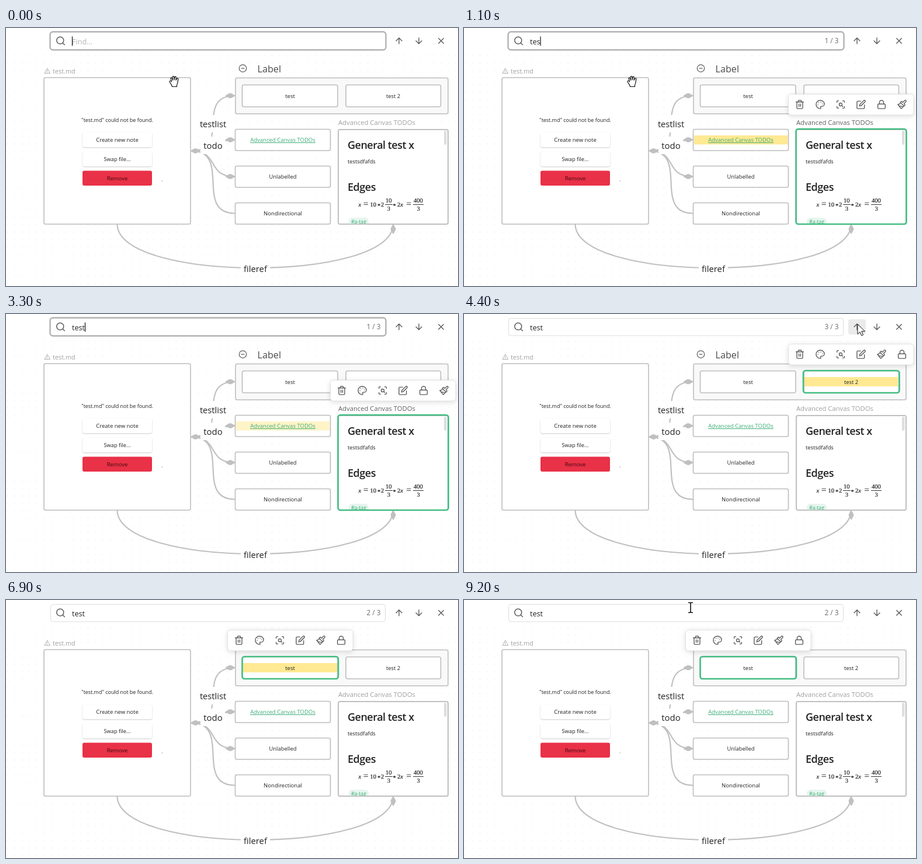
An HTML page for the animation above (9300 ms loop, 774x442 px).

```html
<!DOCTYPE html>
<html lang="en">
<head>
<meta charset="utf-8">
<title>Canvas search</title>
<style>
html, body { margin: 0; width: 100%; height: 100%; overflow: hidden; background: #fff; }
svg { display: block; width: 774px; height: 442px; font-family: "Open Sans", "Noto Sans", sans-serif; }
text { fill: #222; white-space: pre; }
.mid { text-anchor: middle; }
.end { text-anchor: end; }
.head { font-weight: 600; letter-spacing: -.5px; }
.math { font-family: "Liberation Serif", serif; stroke: #222; stroke-width: .2px; }
.node { fill: #fff; stroke: #bdbdbd; stroke-width: 1.6; }
.picked { fill: none; stroke: #43bd82; stroke-width: 2.6; }
.flash { fill: #ffe993; opacity: 0; }
.edge { fill: none; stroke: #c0c0c0; stroke-width: 2.2; }
.tip { fill: #c0c0c0; stroke: #c0c0c0; stroke-width: 2; stroke-linejoin: round; }
.icon { fill: none; stroke: #5c5c5c; stroke-width: 2; stroke-linecap: round; stroke-linejoin: round; }
.card { fill: #fff; filter: drop-shadow(0 1px 1px #0003); }
.bar { fill: #fff; stroke: #e2e2e2; filter: drop-shadow(0 2px 4px #0002); }
</style>
</head>
<body>
<svg id="stage" viewBox="0 0 774 442">
  <defs>
    <pattern id="dots" x="-4.3" y="3.1" width="12.6" height="12.6" patternUnits="userSpaceOnUse">
      <circle cx="6.3" cy="6.3" r=".7" fill="#e6e6e6"/>
    </pattern>
    <clipPath id="note"><rect x="569" y="174" width="188" height="162" rx="4"/></clipPath>
    <path id="search" d="M19 11a8 8 0 1 1-16 0a8 8 0 0 1 16 0M21 21l-4.3-4.3"/>
    <path id="up" d="M12 19V5M5 12l7-7 7 7"/>
    <path id="down" d="M12 5v14M5 12l7 7 7-7"/>
    <path id="close" d="M18 6L6 18M6 6l12 12"/>
    <path id="minus" d="M22 12a10 10 0 1 1-20 0a10 10 0 0 1 20 0M8 12h8"/>
    <path id="warn" d="M12 3L2 21h20zM12 10v4M12 17.5v.1"/>
    <path id="trash" d="M3 6h18M19 6v14a2 2 0 0 1-2 2H7a2 2 0 0 1-2-2V6M8 6V4a2 2 0 0 1 2-2h4a2 2 0 0 1 2 2v2M10 11v6M14 11v6"/>
    <path id="palette" d="M12 2a10 10 0 0 0 0 20c.9 0 1.6-.7 1.6-1.7 0-.4-.2-.8-.4-1.1-.3-.3-.4-.7-.4-1.1a1.6 1.6 0 0 1 1.6-1.7h2c3 0 5.6-2.5 5.6-5.5C22 6 17.500 2 12 2zM13.500 6.500v.1M17.500 10.500v.1M8.500 7.500v.1M6.500 12.500v.1"/>
    <path id="scan" d="M3 7V5a2 2 0 0 1 2-2h2M17 3h2a2 2 0 0 1 2 2v2M21 17v2a2 2 0 0 1-2 2h-2M7 21H5a2 2 0 0 1-2-2v-2M15.500 12a3.500 3.500 0 1 1-7 0a3.500 3.500 0 0 1 7 0M17 17l-2.500-2.500"/>
    <path id="pen" d="M11 4H4a2 2 0 0 0-2 2v14a2 2 0 0 0 2 2h14a2 2 0 0 0 2-2v-7M18.500 2.500a2.100 2.100 0 0 1 3 3L12 15l-4 1 1-4z"/>
    <path id="lock" d="M5 11h14a2 2 0 0 1 2 2v7a2 2 0 0 1-2 2H5a2 2 0 0 1-2-2v-7a2 2 0 0 1 2-2zM7 11V7a5 5 0 0 1 10 0v4"/>
    <path id="brush" d="M18.400 2.600L14 7l-1.600-1.600a2 2 0 0 0-2.800 0L8 7l9 9 1.600-1.600a2 2 0 0 0 0-2.800L17 10l4.400-4.400a2.100 2.100 0 0 0-3-3zM9 8c-2 3-4 3.500-7 4l8 10c2-1 6-5 6-7M14.500 17.500L4.500 15"/>
  </defs>
</svg>
<script>
const LOOP = 9300;
const FLASH = 2000, FADE = 250;
const FIRST = 600, BLUR = 4150, SECOND = 5200;
const stage = document.getElementById('stage');

const text = (x, y, size, str, cls = '', extra = '') =>
  `<text x="${x}" y="${y}" font-size="${size}" class="${cls}" ${extra}>${str}</text>`;
const rect = (x, y, x2, y2, rx, extra = 'class="node"') =>
  `<rect x="${x}" y="${y}" width="${x2 - x}" height="${y2 - y}" rx="${rx}" ${extra}/>`;
const icon = (id, x, y, size = 17, extra = '') =>
  `<use href="#${id}" class="icon" transform="translate(${x} ${y}) scale(${size / 24}) translate(-12 -12)" ${extra}/>`;
const during = (from, to, body) => `<g data-on="${from} ${to}">${body}</g>`;
const flash = (start, x, y, x2, y2) => rect(x, y, x2, y2, 0, `class="flash" data-flash="${start}"`);
const tip = (x, y, turn = 0) =>
  `<path class="tip" d="M-7 0L-1-3.300H1L7 0L1 3.300H-1z" transform="translate(${x} ${y}) rotate(${turn})"/>`;
const branch = (y, bend) =>
  `<path class="edge" d="M317 210.500C${317 + bend} 210.500 ${392 - bend} ${y} 392 ${y}"/>`;
const mask = (x, y, x2, y2) => rect(x, y, x2, y2, 0, 'fill="#fff"');
const toolbar = (x, y, names) =>
  rect(x, y, x + 214.5, y + 35.5, 5, 'class="bar"') +
  names.split(' ').map((n, i) => icon(n, x + 19.5 + 35 * i, y + 17.5)).join('');

const edges =
  branch(116, 70) + branch(191.5, 40) + branch(254.5, 50) + branch(317.5, 70) +
  '<path class="edge" d="M190.500 336C190.500 436 663 436 663 336"/>' +
  tip(324.5, 210.5) + [116, 191.5, 254.5].map(y => tip(384, y)).join('') + tip(663, 344.5, 90) +
  mask(329, 149, 380, 179) + mask(333, 186, 375, 216) + mask(402, 400, 452, 424) +
  text(354.5, 169.5, 14.7, 'testlist', 'mid') +
  text(354.5, 207, 14.9, 'todo', 'mid') +
  text(427, 417.5, 14.8, 'fileref', 'mid');

const missingFile =
  icon('warn', 70.5, 73.5, 11, 'style="stroke:#a5a5a5"') +
  text(80, 77.5, 10.9, 'test.md', '', 'style="fill:#a0a0a0"') +
  rect(65, 85, 316, 336, 3) +
  text(190.5, 161, 8.95, '"test.md" could not be found.', 'mid') +
  rect(131, 179, 250, 204, 3, 'class="card"') +
  rect(131, 212, 250, 237, 3, 'class="card"') +
  rect(131, 244.5, 250, 270, 3, 'fill="#e93147"') +
  text(190.5, 195, 9.5, 'Create new note', 'mid') +
  text(190.5, 228, 9.25, 'Swap file...', 'mid') +
  text(190.5, 261, 9.5, 'Remove', 'mid', 'style="fill:#40090f"') +
  rect(266.5, 261.5, 268.5, 262.5, 0, 'fill="#999"');

const group =
  icon('minus', 405.5, 69, 15) +
  text(430.5, 76, 16.2, 'Label', '', 'style="fill:#4a4a4a"') +
  rect(393, 85.5, 757, 147, 3, 'class="node" style="fill:#f9f9f9"') +
  rect(404.5, 97.5, 568, 135, 3) + rect(582, 97.5, 744.5, 135, 3) +
  flash(SECOND, 406, 108, 567, 124) + flash(BLUR, 583, 108, 743, 124) +
  text(486.5, 120, 9.6, 'test', 'mid') + text(663, 120, 9.4, 'test 2', 'mid');

const leaves =
  [173.5, 236.5, 299.5].map(y => rect(392.5, y, 555.5, y + 36.5, 3)).join('') +
  flash(FIRST, 394, 184, 554, 199.5) +
  text(474, 195, 9.54, 'Advanced Canvas TODOs', 'mid', 'style="fill:#3bac78" text-decoration="underline"') +
  text(474, 258, 9.4, 'Unlabelled', 'mid') +
  text(474, 321, 9.55, 'Nondirectional', 'mid');

const title = color => text(569, 165.5, 11.25, 'Advanced Canvas TODOs', '', `style="fill:${color}"`);
const maths = [
  [603.5, 306, '<tspan font-style="italic">x</tspan>'], [612, 306, '='], [623.5, 306, '10'],
  [636, 308, '*'], [642, 306, '2'], [650, 299, '10'], [652.7, 313, '3'],
  [662.5, 308, '*'], [670, 306, '2<tspan font-style="italic">x</tspan>'], [685.5, 306, '='],
  [698, 299, '400'], [703.5, 313, '3']
].map(([x, y, s]) => text(x, y, s === '=' ? 15 : 10.6, s, 'math')).join('');
const note =
  during(0, FIRST, title('#a0a0a0')) + during(FIRST, BLUR, title('#606060')) + during(BLUR, LOOP, title('#a0a0a0')) +
  rect(569, 174, 757, 336, 3) +
  '<g clip-path="url(#note)">' +
  rect(750, 176, 754.5, 200, 2, 'fill="#dedede"') +
  text(585, 207, 18, 'General test x', 'head') +
  text(585, 232, 9.27, 'testsdfafds') +
  text(585, 279, 18, 'Edges', 'head') +
  maths +
  '<path d="M649 302.500h13M697 302.500h18" stroke="#222" stroke-width=".9"/>' +
  rect(587, 325, 621, 342, 6, 'fill="#e5f5ed"') +
  text(591, 334.5, 8.7, '#a-tag', '', 'style="fill:#3bac78"') +
  '</g>' + rect(569, 174, 757, 336, 3, 'class="node" style="fill:none"');

const selection =
  during(FIRST, BLUR, rect(568.5, 173, 757.5, 336, 4, 'class="picked"') +
    toolbar(555.5, 113.5, 'trash palette scan pen lock brush')) +
  during(BLUR, SECOND, rect(581, 97, 745.5, 135, 4, 'class="picked"') +
    toolbar(555.5, 51.5, 'trash palette scan pen brush lock')) +
  during(SECOND, LOOP, rect(404.5, 97, 569, 135, 4, 'class="picked"') +
    toolbar(379.5, 51.5, 'trash palette scan pen brush lock'));

const counter = n => text(641.5, 26, 11.8, n + ' / 3', 'end', 'style="fill:#6a6a6a"');
const searchBar =
  during(0, BLUR, rect(75.5, 6.5, 650.5, 37.5, 5, 'fill="#fff" stroke="#b2b2b2" stroke-width="2.4"')) +
  during(BLUR, LOOP, rect(76.5, 7.5, 649.5, 37, 4, 'fill="#fff" stroke="#dcdcdc"')) +
  icon('search', 93.5, 22, 18) +
  during(0, FIRST, text(113, 27.5, 12.6, 'Find...', '', 'style="fill:#b4b4b4"')) +
  text(113, 27.5, 12.6, '', '', 'id="query"') +
  '<path id="caret" d="M0 14.500v16" stroke="#111" stroke-width="1.2"/>' +
  during(FIRST, BLUR, counter(1)) + during(BLUR, SECOND, counter(3)) + during(SECOND, LOOP, counter(2)) +
  during(3750, 6080, rect(658, 9, 688, 35, 4, 'fill="#ebebeb"')) +
  icon('up', 673, 22) + icon('down', 707, 22) + icon('close', 745, 22);

const pointers =
  during(0, 1200, `<path transform="translate(288 91)" fill="#fff" stroke="#111" stroke-width="1.200" stroke-linejoin="round"
    d="M-3.500 9.500C-4 6-7 3.500-8 1C-8-1-6-1-4.500 1L-6-4.500C-6-6.500-4-6.500-3.500-4.500L-2.500-1.500L-3-7C-2.500-8.800-.500-8.800-.300-7L0-2L1-7C1.500-8.500 3.300-8 3.200-6.500L3-1.500L4.800-4.500C6-5.500 7.300-4.500 6.800-3C6 0 6.500 4 4.500 6.500V9.500z"/>`) +
  `<path id="arrow" fill="#fff" stroke="#111" stroke-linejoin="round"
    d="M0 0V17L4 13.200L6.800 19.500L9.600 18.300L6.800 12.200H12.500z"/>` +
  `<g id="beam" fill="none"><path id="beamLine" stroke="#fff" stroke-width="3.500" d="M-4-8.500H-1L0-7.500L1-8.500H4M0-7.500V7.500M-4 8.500H-1L0 7.500L1 8.500H4"/>
    <use href="#beamLine"/><path stroke="#111" stroke-width="1.600" d="M-4-8.500H-1L0-7.500L1-8.500H4M0-7.500V7.500M-4 8.500H-1L0 7.500L1 8.500H4"/></g>`;

stage.insertAdjacentHTML('beforeend',
  rect(0, 42, 774, 442, 0, 'fill="url(#dots)"') +
  edges + missingFile + group + leaves + note + selection + searchBar + pointers);

const byId = id => document.getElementById(id);
const query = byId('query'), caret = byId('caret');
const windows = [...stage.querySelectorAll('[data-on]')].map(el => [el, ...el.dataset.on.split(' ').map(Number)]);
const flashes = [...stage.querySelectorAll('[data-flash]')].map(el => [el, +el.dataset.flash]);
const keys = [600, 800, 1000, 1180];
const arrowPath = [[3350, 650, -20], [3750, 672, 16], [4100, 674, 17.5], [5950, 674, 17.5], [6000, 671.5, 28.5], [6350, 600, 445]];
const beamPath = [[9000, 440, 30], [9150, 388, 13]];

const show = (el, on) => { el.style.visibility = on ? 'visible' : 'hidden'; };

function follow(el, path, t, until) {
  const on = t >= path[0][0] && t < until;
  show(el, on);
  if (!on) return;
  const next = path.findIndex(p => p[0] > t);
  let [, x, y] = path[path.length - 1];
  if (next > 0) {
    const a = path[next - 1], b = path[next];
    const k = (t - a[0]) / (b[0] - a[0]);
    x = a[1] + (b[1] - a[1]) * k;
    y = a[2] + (b[2] - a[2]) * k;
  }
  el.setAttribute('transform', `translate(${x} ${y})`);
}

function draw(t) {
  for (const [el, from, to] of windows) show(el, t >= from && t < to);
  for (const [el, start] of flashes) {
    const past = t - start - FLASH - (start === FIRST ? keys[3] - FIRST : 0);
    el.style.opacity = t < start ? 0 : Math.max(0, Math.min(1, 1 - past / FADE));
  }
  const typed = keys.filter(k => k <= t).length;
  query.textContent = 'test'.slice(0, typed);
  const idle = t - (typed ? keys[typed - 1] : 0);
  show(caret, t < BLUR && idle % 1000 < 500);
  const width = typed ? query.getComputedTextLength() : 0;
  caret.setAttribute('transform', `translate(${113.5 + width} 0)`);
  follow(byId('arrow'), arrowPath, t, 6350);
  follow(byId('beam'), beamPath, t, LOOP);
}

const begin = performance.now();
function tick() {
  draw((performance.now() - begin) % LOOP);
  requestAnimationFrame(tick);
}
tick();
</script>
</body>
</html>
```
